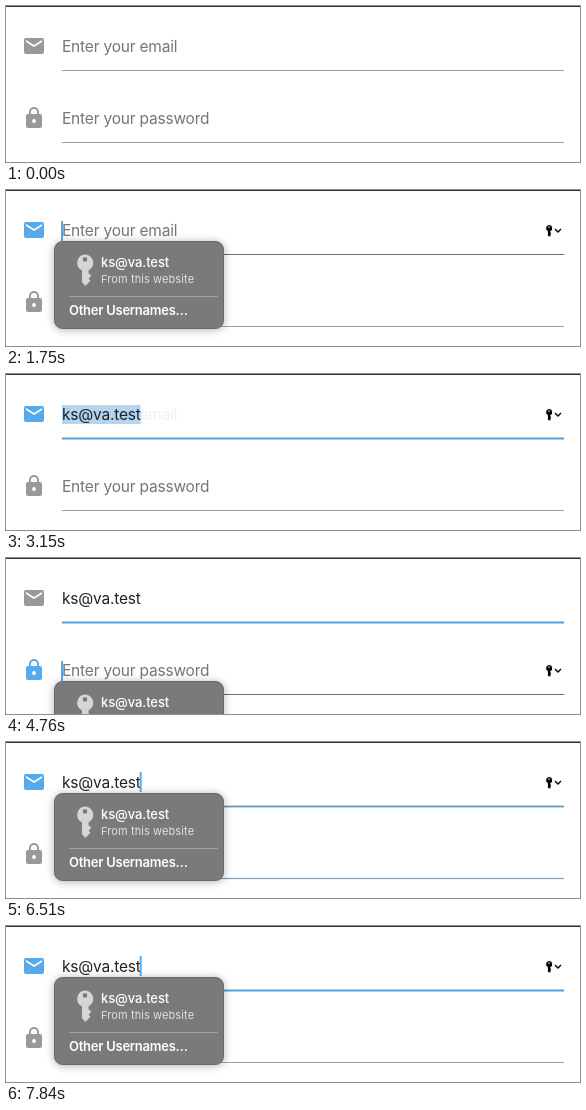
Animation, 574 px wide and 156 px high, one loop 8 s. Source, as an HTML page:

```html
<!DOCTYPE html>
<html lang="en">
<head>
<meta charset="utf-8">
<title>Login form</title>
<style>
  html, body { margin: 0; width: 100%; height: 100%; overflow: hidden; background: #fff; }
  svg { display: block; }
  text { font: 15.5px Inter, Roboto, sans-serif; letter-spacing: -.2px; fill: #757575; }
  .value { fill: #222; }
  #popup text { font-size: 13px; font-weight: 500; letter-spacing: -.1px; fill: #fff; }
  #popup .note { font-size: 11px; font-weight: 400; letter-spacing: .1px; fill: #e0e0e0; }
  #popup .other { font-weight: 600; letter-spacing: -.25px; }
  #panel { filter: drop-shadow(0 1px 4px rgba(0, 0, 0, .3)); }
</style>
</head>
<body>
<svg width="574" height="156" viewBox="0 0 574 156">
  <rect width="574" height="1" fill="#303030"/>

  <path id="mail" transform="translate(16 28)" d="M20 4H4c-1.1 0-2 .9-2 2v12c0 1.1.9 2 2 2h16c1.1 0 2-.9 2-2V6c0-1.1-.9-2-2-2zm0 4l-8 5-8-5V6l8 5 8-5z"/>
  <path id="lock" transform="translate(16 100)" d="M18 8h-1V6c0-2.8-2.2-5-5-5S7 3.2 7 6v2H6c-1.1 0-2 .9-2 2v10c0 1.1.9 2 2 2h12c1.1 0 2-.9 2-2V10c0-1.1-.9-2-2-2zm-6 9a2 2 0 1 1 0-4 2 2 0 0 1 0 4zm3.1-9H8.9V6a3.1 3.1 0 0 1 6.2 0z"/>

  <rect id="emailBase" x="56" y="64" width="502" height="1"/>
  <rect id="emailLine" x="56" y="63.5" width="502" height="2" fill="#599fd8"/>
  <rect id="passBase" x="56" y="136" width="502" height="1"/>
  <rect id="passLine" x="56" y="135.5" width="502" height="2" fill="#599fd8"/>

  <rect id="selection" x="56" y="31" height="19" fill="#b3d6f4"/>
  <text id="hint" x="56" y="46">Enter your email</text>
  <text id="email" class="value" x="56" y="46">ks@va.test</text>
  <text x="56" y="118">Enter your password</text>

  <g id="focus">
    <rect id="caret" y="31" width="2" height="20" fill="#56a9ea"/>
    <path d="M543 35a3.2 3.2 0 0 1 1.4 6.1v1.4l.9.8-.9.9.7.8-1.9 1.8-1.3-1.3v-4.4a3.2 3.2 0 0 1 1.1-6.1z"/>
    <circle cx="543" cy="37" r=".8" fill="#fff"/>
    <path d="M549 39l3 3 3-3" fill="none" stroke="#000" stroke-width="1.4"/>
    <g id="popup">
      <rect id="panel" x="48.5" y="51.5" width="169" height="87" rx="8" fill="#7a7a7c" stroke="#69696b"/>
      <rect id="hover" x="56" y="58" width="156" height="44" rx="4" fill="#73a9ea"/>
      <path id="key" fill-rule="evenodd" d="M79 64.5a8.3 8.3 0 0 1 3.5 15.8v2.7l3 2.7-3 2.8 2 2.2-5 5-3.5-3.4V80.3A8.3 8.3 0 0 1 79 64.5zm0 2.6a2.3 2.3 0 1 0 0 4.6 2.3 2.3 0 0 0 0-4.6z"/>
      <text x="95" y="77">ks@va.test</text>
      <text class="note" x="95" y="93">From this website</text>
      <rect x="63" y="106" width="149" height="1" fill="#a3a3a5"/>
      <text class="other" x="63" y="125">Other Usernames…</text>
    </g>
  </g>
</svg>
<script>
  const LOOP = 8000, TICK = 70;
  const EMAIL = 1750, PICK = 2870, PASS = 4760, BACK = 6440;
  const GREY = '#999', BLUE = '#56a9ea';

  const get = id => document.getElementById(id);
  const set = (id, attrs) => {
    for (const name in attrs) get(id).setAttribute(name, attrs[name]);
  };
  const clamp = v => Math.min(1, Math.max(0, v));
  const show = on => on ? 1 : 0;

  // Underline transition: three ticks, easing out
  const ease = (t, start) => {
    const p = clamp((t - start) / (2 * TICK));
    return p * (2 - p);
  };
  // Four-tick fade, already under way on its first tick
  const fade = (t, start) => clamp((t - start + TICK) / (4 * TICK));

  function draw(now) {
    const time = now % LOOP;
    const t = Math.floor(time / TICK) * TICK;
    const onPass = t >= PASS && t < BACK;
    const onEmail = t >= EMAIL && !onPass;
    const filled = t >= PICK;
    const selected = filled && t < PASS;
    const start = t >= BACK ? BACK : onPass ? PASS : EMAIL;
    const width = get('email').getComputedTextLength();
    const toEmail = ease(t, BACK), toPass = ease(t, PASS);

    set('mail', { fill: onEmail ? BLUE : GREY });
    set('lock', { fill: onPass ? BLUE : GREY });
    set('emailBase', { fill: onEmail ? '#6c6c6c' : '#a0a0a0' });
    set('passBase', { fill: onPass ? '#6c6c6c' : '#a0a0a0' });
    set('emailLine', { opacity: ease(t, EMAIL) - toPass + toEmail });
    set('passLine', { opacity: toPass - toEmail });

    set('hint', { opacity: selected ? .1 : show(!filled) });
    set('email', { opacity: show(filled) });
    set('selection', { width, opacity: show(selected) });

    set('focus', { opacity: show(t >= EMAIL), transform: `translate(0 ${onPass ? 72 : 0})` });
    set('caret', {
      x: start === BACK ? 55 + width : 55,
      y: start === BACK ? 30 : 31,
      opacity: selected ? 0 : 1 - fade(t, start + 700) + fade(t, start + 1190)
    });

    const hover = onPass ? t >= 5320 : t >= 2520 && t < PASS;
    set('popup', { opacity: selected ? 1 - clamp((t - PICK + TICK) / (4 * TICK)) : 1 });
    set('hover', { opacity: show(hover) });
    set('key', { fill: hover ? '#fff' : '#d6d6d6' });
  }

  const begin = performance.now();
  function frame() {
    draw(performance.now() - begin);
    requestAnimationFrame(frame);
  }
  frame();
</script>
</body>
</html>
```
